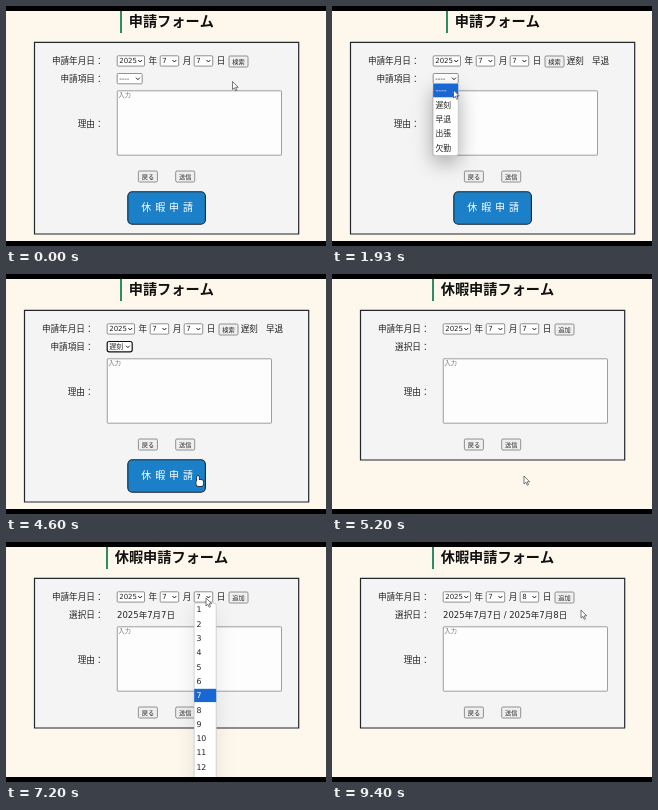
Recreate the animation shown at these times as an HTML page with a canvas. Size 320 by 240 pixels, loop 9470 ms.

```html
<!DOCTYPE html>
<html lang="ja">
<head>
<meta charset="utf-8">
<style>
html, body { margin: 0; width: 100%; height: 100%; overflow: hidden; background: #000; }
canvas { display: block; width: 320px; height: 240px; }
</style>
</head>
<body>
<canvas id="stage" width="320" height="240"></canvas>
<script>
const LOOP = 9470, ROW = 14.3;
const c = document.getElementById('stage').getContext('2d');
const SANS = '"DejaVu Sans", "Noto Sans CJK JP", sans-serif';
const INK = '#222';

// When each state change happens, in ms
const T = { found: 1000, open: 1620, picked: 2650, page: 5030, add1: 6330,
            dayOpen: 7080, dayPicked: 8000, add2: 8930 };

// Pointer moves: leave, arrive, x, y
const MOVES = [
  [200, 850, 227, 54],     // search button
  [1150, 1500, 120, 72],   // item select
  [1650, 1930, 121.5, 84], // open list
  [2150, 2500, 118, 96],
  [2700, 3130, 181, 97],   // text area
  [3270, 4000, 192, 202],  // request button
  [5400, 6130, 237.5, 54], // add button
  [6380, 6620, 200, 54],   // day select
  [7150, 7800, 200, 166],
  [8000, 8200, 231, 75],
  [8260, 8600, 237, 54],   // add button again
  [8980, 9400, 249, 68]
];

function pointerAt(t) {
  let x = 226.5, y = 75.5;
  for (const [from, to, X, Y] of MOVES) {
    const p = Math.min(1, Math.max(0, (t - from) / (to - from)));
    const e = p * p * (3 - 2 * p);
    x += (X - x) * e;
    y += (Y - y) * e;
  }
  return { x, y };
}

const inside = (p, x, y, w, h) => p.x >= x && p.x <= x + w && p.y >= y && p.y <= y + h;

function text(s, x, y, size, color = INK, align = 'left', weight = 400) {
  c.font = `${weight} ${size}px ${SANS}`;
  c.fillStyle = color;
  c.textAlign = align;
  c.fillText(s, x, y + size * 0.36);
}

function stroke(path, color = INK, width = 0.8) {
  c.strokeStyle = color;
  c.lineWidth = width;
  c.stroke(path);
}

function box(x, y, w, h, fill, line, width = 0.8, r = 0) {
  const path = new Path2D();
  path.roundRect(x, y, w, h, r);
  c.fillStyle = fill;
  c.fill(path);
  if (line) stroke(path, line, width);
}

function select(x, y, w, value, focus) {
  box(x, y, w, 10.3, '#fff', focus ? '#111' : '#767676', focus ? 1.2 : 0.8, focus ? 2 : 1);
  text(value, x + 2, y + 5.1, 7);
  stroke(new Path2D(`M${x + w - 6.2} ${y + 4.2}l1.9 2 1.9-2`), INK, 1);
}

function button(x, y, label, p) {
  const w = 19, h = 11;
  box(x, y, w, h, inside(p, x, y, w, h) ? '#e2e2e2' : '#efefef', '#777', 0.8, 1.2);
  text(label, x + w / 2, y + 5.4, 6.2, INK, 'center');
}

function popup(x, y, w, items, active, shadow) {
  const h = items.length * ROW;
  c.save();
  c.shadowColor = `rgba(0,0,0,${shadow})`;
  c.shadowBlur = 20;
  c.shadowOffsetY = 7;
  box(x, y, w, h, '#fff', null, 0, 2);
  c.restore();
  box(x, y, w, h, '#fff', '#aaa', 0.5, 2);
  items.forEach((s, i) => {
    const top = y + i * ROW;
    if (i === active) box(x, top, w, ROW - 1, '#1967d2');
    text(s, x + 2.2, top + ROW / 2 - 0.5, 7.8, i === active ? '#fff' : INK);
  });
}

function arrow({ x, y }) {
  const path = new Path2D(`M${x} ${y}v8l1.9-1.7 1.3 3 1.3-.6-1.3-2.9h2.5z`);
  c.fillStyle = '#fff';
  c.fill(path);
  stroke(path, '#444', 0.7);
}

function hand({ x, y }) {
  for (const line of [INK, null]) {
    box(x - 0.9, y, 1.8, 7, '#fff', line, 1.4, 0.9);
    box(x - 1.6, y + 4, 6.8, 6, '#fff', line, 1.4, 2);
  }
}

function beam({ x, y }) {
  stroke(new Path2D(`M${x - 1.7} ${y - 3.7}h3.4m-1.7 0v7.4m-1.7 0h3.4`), '#333');
}

function draw(t) {
  const p = pointerAt(t);
  const leave = t >= T.page;
  const found = t >= T.found && !leave;
  const picked = t >= T.picked;
  const dayPicked = t >= T.dayPicked;
  const listOpen = t >= T.open && !picked;
  const dayOpen = t >= T.dayOpen && !dayPicked;
  const at = x => found ? x - 10 : x;

  c.fillStyle = '#000';
  c.fillRect(0, 0, 320, 240);
  c.save();
  c.beginPath();
  c.rect(0, 5, 320, 230);
  c.clip();
  c.fillStyle = '#fef8ec';
  c.fillRect(0, 5, 320, 230);

  const barX = leave ? 100 : 114;
  c.fillStyle = '#2e8b64';
  c.fillRect(barX, 5, 2, 22);
  text(leave ? '休暇申請フォーム' : '申請フォーム', barX + 8.7, 15.2, 14.2, '#111', 'left', 700);

  box(at(28.5), 36.3, found ? 284.2 : 264.2, leave ? 149.7 : 191.7, '#f4f4f4', '#20282e', 1.2);

  const label = (s, y) => text(s, at(97.5), y, 8.6, INK, 'right');
  label('申請年月日：', 54.8);
  label(leave ? '選択日：' : '申請項目：', 72.5);
  label('理由：', 118);

  const day = dayPicked ? '8' : '7';
  const dayFocus = dayPicked && t < T.add2 - 200;
  [['2025', '年', 111.2, 27.3], ['7', '月', 154.2, 18.5], [day, '日', 188.2, 18.5, dayFocus]]
    .forEach(([value, unit, x, w, focus]) => {
      select(at(x), 49.8, w, value, focus);
      text(unit, at(x + w + 4), 54.5, 8.6);
    });
  button(at(223), 50, leave ? '追加' : '検索', p);

  if (found) ['遅刻', '早退'].forEach((s, i) => text(s, 234.7 + i * 25.3, 54.7, 8.6));
  if (!leave) select(at(111.2), 67.5, 25, picked ? '遅刻' : '----', picked);
  else if (t >= T.add1)
    text('2025年7月7日' + (t >= T.add2 ? ' / 2025年7月8日' : ''), 111, 72.5, 8.5);

  box(at(111.3), 84.8, 164.2, 64.4, '#fdfdfd', '#888', 0.8, 0.6);
  text('入力', at(112.5), 89, 6.2, '#777');
  button(132.4, 165, '戻る', p);
  button(169.7, 165, '送信', p);

  if (!leave) {
    box(121.8, 185.7, 77.6, 32.5, '#1c80c8', '#18242d', 1.1, 4.5);
    [...'休暇申請'].forEach((s, i) => text(s, 140.3 + i * 13.9, 201.6, 10, '#fff', 'center'));
  }
  if (listOpen)
    popup(101.2, 78, 25, ['----', '遅刻', '早退', '出張', '欠勤'], p.y > 92 ? 1 : 0, 0.35);
  if (dayOpen) {
    const days = Array.from({ length: 31 }, (_, i) => i + 1);
    popup(188.2, 61, 22, days, p.y < 62 ? 6 : Math.floor((p.y - 61) / ROW), 0.1);
  }

  if (!leave && inside(p, 121, 185, 79, 34)) hand(p);
  else if (!listOpen && !dayOpen && inside(p, at(111), 85, 165, 65)) beam(p);
  else arrow(p);
  c.restore();
}

const start = performance.now();
function tick() {
  draw((performance.now() - start) % LOOP);
  requestAnimationFrame(tick);
}
tick();
</script>
</body>
</html>
```
